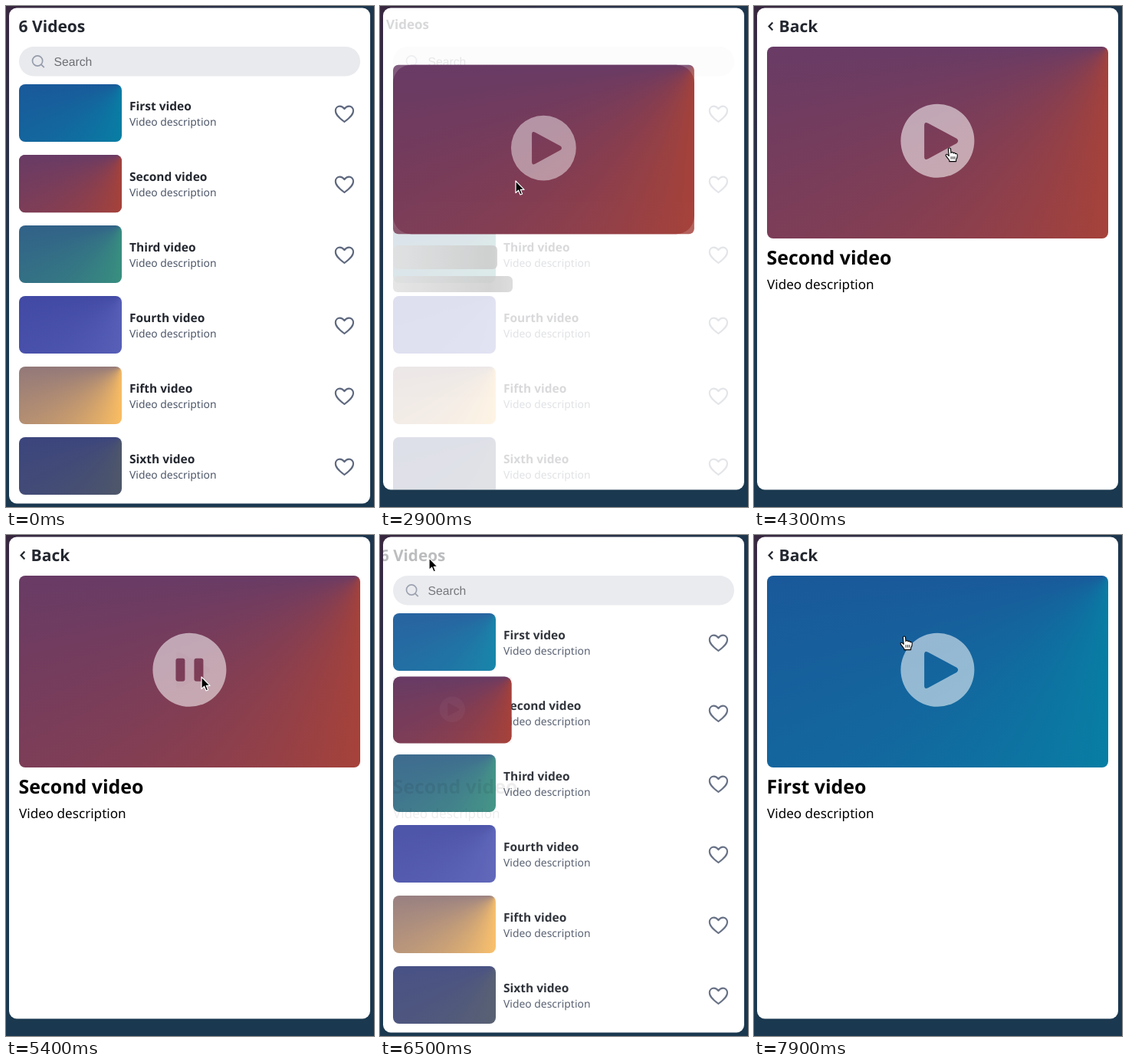
Write an HTML page that moves like this. It is 480x653 px and loops after 8000 ms.

```html
<!DOCTYPE html>
<html lang="en">
<head>
<meta charset="utf-8">
<title>Video list</title>
<style>
  html, body { margin: 0; width: 100%; height: 100%; overflow: hidden; }
  body { position: relative; background: radial-gradient(ellipse 110% 60% at 0 0, #38273f, #1a384f); }
  #card, .layer { position: absolute; left: 0; top: 0; width: 480px; height: 653px; }
  #card { background: #fff; }
  svg { display: block; overflow: visible; font-family: "Noto Sans", "Open Sans", sans-serif; text-rendering: geometricPrecision; }
  .thumb { position: absolute; left: 17px; width: 134px; height: 75.3px; border-radius: 8px; }
  .title { font-size: 15.5px; font-weight: 700; fill: #23272f; }
  .desc { font-size: 13.9px; fill: #4e5769; }
  .heading { font-size: 21px; font-weight: 700; fill: #23272f; }
  .underlined { text-decoration: underline; }
  .heart { fill: none; stroke: #5e687e; stroke-width: 2.1; stroke-linejoin: round; }
  #hero { position: absolute; left: 0; top: 0; width: 445px; height: 250px; transform-origin: 0 0; }
  #hero > * { position: absolute; inset: 0; }
  #heroSmall { border-radius: 26.6px; }
  #heroLarge { border-radius: 8px; }
  #controls { opacity: .55; }
  #controls path { mix-blend-mode: plus-lighter; }
  .bone {
    position: absolute; left: 17px; border-radius: 6px;
    background: #f6f7f8 linear-gradient(to right, #e6e6e6 5%, #ccc 25%, #e6e6e6 35%) no-repeat;
    background-size: 800px 104px;
  }
</style>
</head>
<body>
<div id="card">
  <div id="list" class="layer"></div>
  <div id="detail" class="layer">
    <div id="skeleton" class="layer">
      <div class="bone" style="top:312px;width:136px;height:31px"></div>
      <div class="bone" style="top:352px;width:156px;height:21px"></div>
    </div>
    <svg class="layer">
      <g id="content">
        <text id="detailTitle" x="16.6" y="337" font-size="24.9" font-weight="700"></text>
        <text x="17" y="369" font-size="17.1">Video description</text>
      </g>
    </svg>
  </div>
  <div id="hero">
    <div id="heroSmall"></div>
    <div id="heroLarge">
      <svg width="445" height="250">
        <g id="controls" fill="#fff" fill-rule="evenodd" transform="translate(222.4 122.8)">
          <path id="play"/>
          <path id="pause"/>
        </g>
      </svg>
    </div>
  </div>
  <svg class="layer">
    <g id="home"><text class="heading" x="-.4" y="20">6 Videos</text></g>
    <g id="back">
      <path d="M7.3 7.6 2.6 12.5l4.7 4.9" fill="none" stroke="#23272f" stroke-width="2.2"/>
      <text id="backText" class="heading" x="15.6" y="20">Back</text>
    </g>
  </svg>
</div>
<svg class="layer">
  <g id="cursor" stroke-linejoin="round">
    <path id="arrow" d="M0 0V15.6L3.6 12.2 6 18 8.6 16.9 6.2 11.3H11.1Z" fill="#000" stroke="#fff" stroke-width="1.2"/>
    <g id="hand" fill="#fff" stroke="#000" stroke-width="1.1">
      <path d="M-1.6 1.6C-1.6-.6 1.5-.6 1.6 1.6L2 6.6C2.4 5 4.7 5.2 4.9 7 5.6 5.8 7.5 6.2 7.7 7.8 8.6 7 10.3 7.6 10.3 9.4 10.4 12.6 9.6 13.8 8.6 15.4V17.6H-.2V16C-1.6 14.4-3 12.6-4.4 10.6-5.8 8.8-3.8 7.6-2.4 8.8L-.8 10.4Z"/>
      <path d="M2.2 11.2V14.6M4.6 11.2V14.6M6.9 11.2V14.6" stroke-width=".9"/>
    </g>
  </g>
</svg>
<script>
  const LOOP = 8000, ROW = 92;
  const videos = [
    ['First', '#087ea4'], ['Second', '#a6423a'], ['Third', '#388f7f'],
    ['Fourth', '#575fb7'], ['Fifth', '#fabd62'], ['Sixth', '#4e5769'],
  ];
  // Page changes: start time, whether the detail page opens, video index
  const navigation = [[-1000, 0, 1], [2768, 1, 1], [6330, 0, 1], [7430, 1, 0]];
  const LOADED = 3790, PAUSED = 4690, RESUMED = 5390;
  const pointer = [
    [1800, 46, 266], [2400, 177, 228], [3000, 177, 228], [3500, 255, 185],
    [5700, 255, 185], [6150, 64, 30], [6700, 64, 30], [7080, 196, 132],
  ];
  const handTimes = [
    [1850, 2768], [3330, LOADED], [LOADED + 400, PAUSED], [PAUSED + 250, RESUMED],
    [RESUMED + 250, 5800], [6080, 6300], [7000, 7400], [7830, LOOP],
  ];

  const $ = id => document.getElementById(id);
  const clamp = v => Math.min(1, Math.max(0, v));
  const mix = (a, b, p) => a + (b - a) * p;
  const within = (t, a, b) => t >= a && t < b;
  const gradient = color => `conic-gradient(at top right, #c76a15, ${color}, #2b3491)`;

  function bezier(x1, y1, x2, y2) {
    const at = (a, b, u) => 3 * a * u * (1 - u) ** 2 + 3 * b * u * u * (1 - u) + u ** 3;
    return x => {
      if (x <= 0) return 0;
      if (x >= 1) return 1;
      let lo = 0, hi = 1;
      for (let i = 0; i < 24; i++) {
        const mid = (lo + hi) / 2;
        if (at(x1, x2, mid) < x) lo = mid; else hi = mid;
      }
      return at(y1, y2, lo);
    };
  }
  const ease = bezier(.25, .1, .25, 1);
  const easeIn = bezier(.42, 0, 1, 1);
  const easeOut = bezier(0, 0, .58, 1);
  const slide = bezier(.4, 0, .2, 1);
  const leave = bezier(.4, 0, 1, 1);
  const enter = bezier(0, 0, .2, 1);

  function build() {
    const heart = 'M0 10.4C-5 6.6-11.6 2-11.6-4.1-11.6-7.6-9-9.9-6-9.9-3.4-9.9-1.6-8.6 0-6.4 1.6-8.6 3.4-9.9 6-9.9 9-9.9 11.6-7.6 11.6-4.1 11.6 2 5 6.6 0 10.4Z';
    const thumbs = videos.map(([, color], i) =>
      `<div class="thumb" style="top:${102 + ROW * i}px;background:${gradient(color)}"></div>`);
    const rows = videos.map(([name], i) => `<g transform="translate(0 ${ROW * i})">
      <g class="link"><text class="title" x="161" y="136">${name} video</text>
      <text class="desc" x="161" y="156">Video description</text></g>
      <path class="heart" d="${heart}" transform="translate(441.4 140.5)"/></g>`);
    $('list').innerHTML = thumbs.join('') + `<svg class="layer">
      <rect x="17" y="53" width="445" height="38.5" rx="19.2" fill="#e9eaee"/>
      <path d="M47.7 71.5a6.6 6.6 0 1 1-13.2 0a6.6 6.6 0 1 1 13.2 0M46 76.3l3.8 3.8" fill="none" stroke="#959cab" stroke-width="1.7"/>
      <text x="62.5" y="77.5" font-size="15.7" fill="#6c6e73" font-family="Liberation Sans, Arial, sans-serif">Search</text>
      ${rows.join('')}</svg>`;

    const disc = 'M-48 0A48 48 0 1 1 48 0A48 48 0 1 1-48 0Z';
    const bar = x => `M${x + 3}-15h6q3 0 3 3v24q0 3-3 3h-6q-3 0-3-3v-24q0-3 3-3Z`;
    $('play').setAttribute('d', disc + 'M-17.3-20Q-17.3-25.6-12.4-23L25-3Q28.6 0 25 3.2L-12.4 23.4Q-17.3 26-17.3 20.4Z');
    $('pause').setAttribute('d', disc + bar(-18) + bar(6));
  }

  function drawNav(opening, elapsed, open) {
    const width = mix(87, 67, open), sign = opening ? -1 : 1;
    const shift = 50 * slide(elapsed / 400);
    const place = (id, ownWidth, incoming) => {
      const x = incoming ? -sign * (50 - shift) : sign * shift;
      const alpha = incoming ? enter((elapsed - 150) / 210) : 1 - leave(elapsed / 150);
      $(id).setAttribute('transform', `translate(${17 + x} 14) scale(${width / ownWidth})`);
      $(id).setAttribute('opacity', alpha);
    };
    place('home', 87, !opening);
    place('back', 67, opening);
  }

  function drawDetail(t, index, open) {
    const since = index === 1 ? t - LOADED : 1000;
    const gone = easeOut(since / 150);
    $('detail').style.opacity = open;
    $('detailTitle').textContent = videos[index][0] + ' video';
    $('skeleton').style.opacity = 1 - gone;
    $('skeleton').style.transform = `translateY(${10 * gone}px)`;
    const shimmer = -468 + 936 * (((t + 520) / 1000) % 1);
    document.querySelectorAll('.bone').forEach(b => { b.style.backgroundPosition = shimmer + 'px 0'; });
    $('content').setAttribute('opacity', easeIn((since - 150) / 210));
    $('content').setAttribute('transform', `translate(0 ${10 * (1 - easeIn(since / 400))})`);
  }

  function drawHero(t, index, open) {
    const scale = mix(134, 445, open) / 445;
    const top = mix(102 + ROW * index, 53, open);
    $('hero').style.transform = `translate(17px, ${top}px) scale(${scale})`;
    $('heroSmall').style.background = $('heroLarge').style.background = gradient(videos[index][1]);
    $('heroLarge').style.opacity = open;
    const paused = ease((t - PAUSED) / 250) - ease((t - RESUMED) / 250);
    $('play').setAttribute('opacity', 1 - paused);
    $('pause').setAttribute('opacity', paused);
  }

  function drawCursor(t) {
    let [, x, y] = pointer[0];
    for (let i = 1; i < pointer.length; i++) {
      const [t0, x0, y0] = pointer[i - 1], [t1, x1, y1] = pointer[i];
      if (t < t0) break;
      const p = clamp((t - t0) / (t1 - t0)), s = p * p * (3 - 2 * p);
      x = mix(x0, x1, s);
      y = mix(y0, y1, s);
    }
    const hand = handTimes.some(([a, b]) => within(t, a, b));
    $('cursor').setAttribute('transform', `translate(${x} ${y})`);
    $('cursor').setAttribute('display', t < 1800 ? 'none' : 'inline');
    $('hand').setAttribute('display', hand ? 'inline' : 'none');
    $('arrow').setAttribute('display', hand ? 'none' : 'inline');
  }

  function render(t) {
    const [start, opening, index] = navigation.filter(n => n[0] <= t).pop();
    const elapsed = t - start;
    const progress = ease(elapsed / 250);
    const open = opening ? progress : 1 - progress;

    $('card').style.clipPath = `inset(2.5px 5px ${opening ? 22.5 : 4.5}px 4px round 10px)`;
    $('list').style.opacity = 1 - open;
    document.querySelectorAll('.link').forEach((link, i) => {
      const hovered = i === 1 ? within(t, 1850, 4000) : i === 0 && t >= 7000;
      link.classList.toggle('underlined', hovered);
    });
    $('backText').classList.toggle('underlined', within(t, 6080, 7000));
    drawNav(opening, elapsed, open);
    drawDetail(t, index, open);
    drawHero(t, index, open);
    drawCursor(t);
  }

  build();
  const origin = performance.now();
  function tick() {
    render((performance.now() - origin) % LOOP);
    requestAnimationFrame(tick);
  }
  tick();
</script>
</body>
</html>
```
